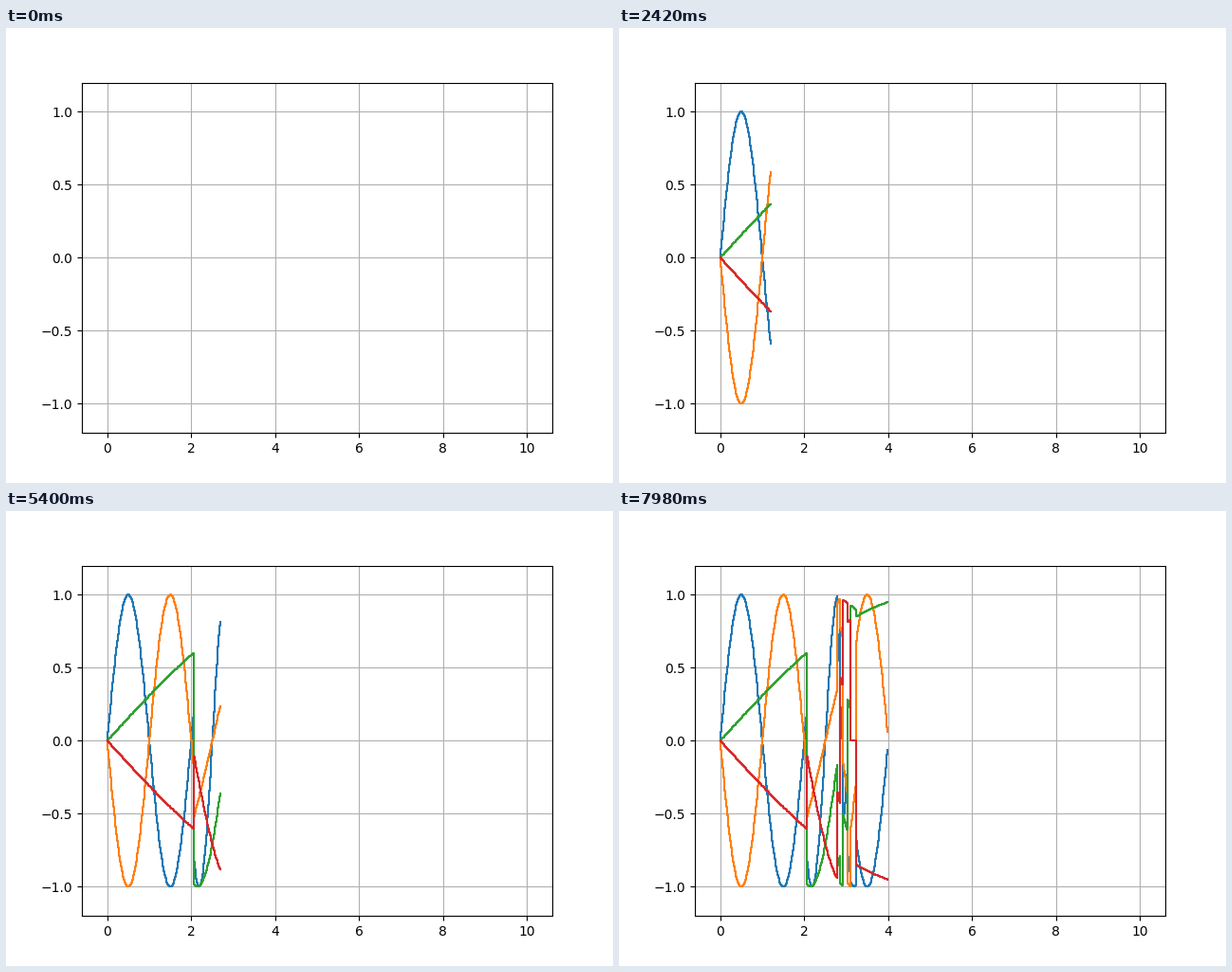
Recreate the animation shown at these times as a matplotlib script. Size 640 by 480 pixels, loop 8 s.

```python
import numpy as np
import matplotlib.pyplot as plt
from matplotlib.animation import FuncAnimation

FRAMES = 400
STEP = 0.01
BASE = (1.0, -1.0, 0.1, -0.1)

# (first sample, frequency shift): one jump up, then down in steps of 0.1
SHIFTS = ((207, 0.6), (279, 0.5), (286, 0.4), (292, 0.3),
          (303, 0.2), (311, 0.1), (324, 0.0))

index = np.arange(FRAMES)
time = index * STEP
shift = np.zeros(FRAMES)
for start, value in SHIFTS:
    shift[start:] = value


def signal(base):
    """Sampled wave, delayed by one step so each value is held until the next."""
    wave = np.sin(np.pi * (base + shift) * time)
    return np.concatenate(([wave[0]], wave[:-1]))


signals = [signal(base) for base in BASE]

fig, ax = plt.subplots(figsize=(6.4, 4.8), dpi=100)
ax.set_xlim(-0.6, 10.6)
ax.set_ylim(-1.2, 1.2)
ax.grid()
lines = [ax.plot([], [], drawstyle="steps-pre", color=f"C{i}")[0]
         for i in range(len(BASE))]


def update(frame):
    count = frame + 1 if frame > 1 else 0
    for line, values in zip(lines, signals):
        line.set_data(time[:count], values[:count])
    return lines


def init():
    return update(0)


anim = FuncAnimation(fig, update, frames=FRAMES, init_func=init,
                     interval=20, repeat=True, repeat_delay=0)
plt.show()
```
